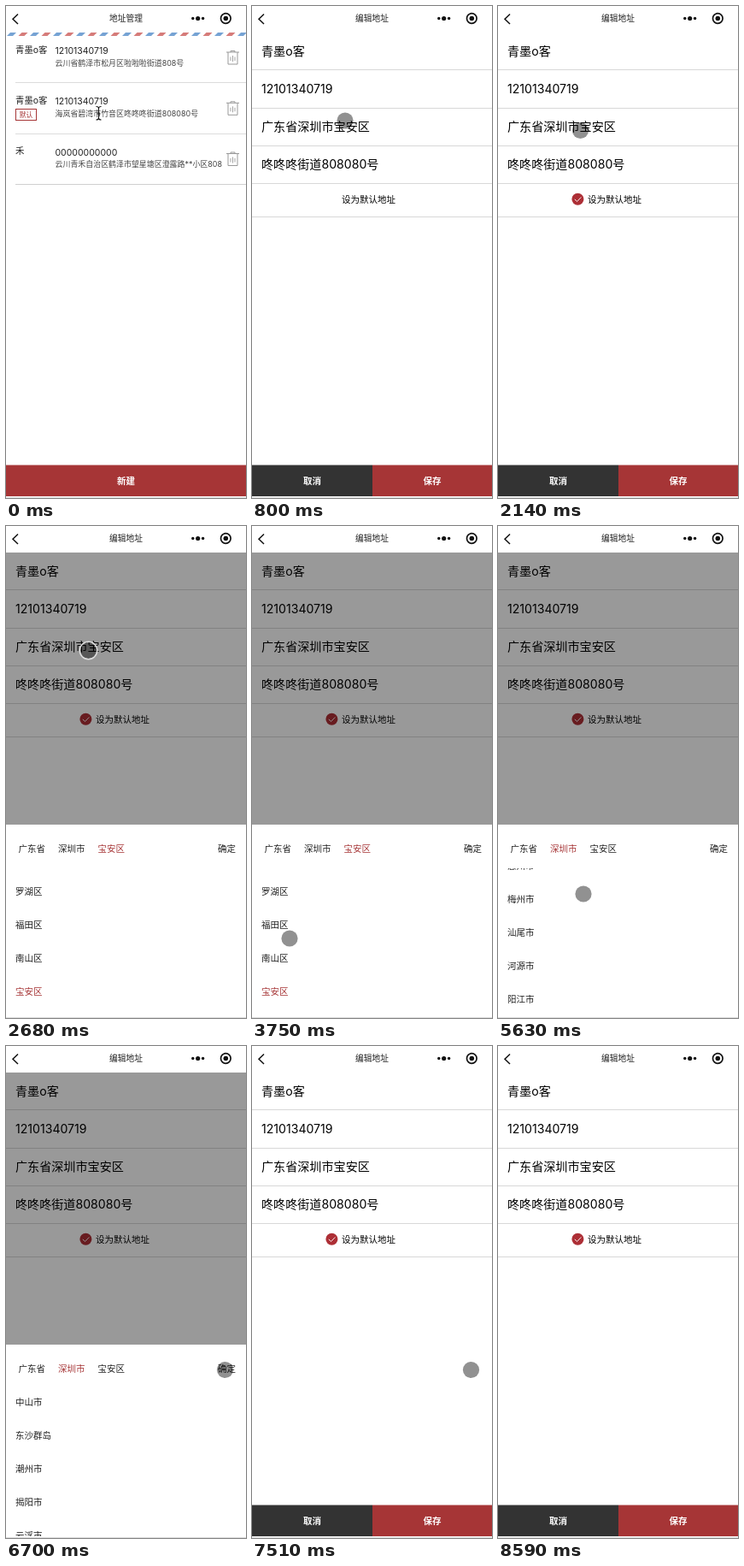
Animation of 281 by 575 pixels, one loop 9.39 s. Source, as an HTML page:

```html
<!DOCTYPE html>
<html lang="zh-CN">
<head>
<meta charset="utf-8">
<title>地址管理</title>
<style>
  html, body { margin: 0; width: 100%; height: 100%; overflow: hidden; background: #fff; }
  svg { display: block; width: 100vw; height: 100vh; }
  text { font-family: Inter, "Noto Sans CJK SC", "Noto Sans CJK", sans-serif; white-space: pre; }
</style>
</head>
<body>
<svg id="stage" viewBox="0 0 281 575"></svg>
<script>
const LOOP = 9390, RED = '#a63536', INK = '#222', ROW = 39;
const stage = document.getElementById('stage');

const text = (x, middle, size, content, extra = '') =>
  `<text x="${x}" y="${middle + size * 0.37}" font-size="${size}" fill="${INK}" ${extra}>${content}</text>`;
const rect = (x, y, w, h, fill, extra = '') =>
  `<rect x="${x}" y="${y}" width="${w}" height="${h}" fill="${fill}" ${extra}/>`;
const rule = (x, y, color = '#dcdcdc') => rect(x, y, 281 - x, 1, color);
const button = (x, w, label, fill) => rect(x, 536.5, w, 36.5, fill) +
  text(x + w / 2, 555, 10.5, label, 'style="fill:#fff" font-weight="700" text-anchor="middle"');

// Address list
const trash = y => `<g transform="translate(265.5 ${y})" fill="none" stroke="#999">
  <path d="M-7.5-6.5H7.5M-2.5-6.5V-8H2.5V-6.5M-5.5-6.5V7.5H5.5V-6.5"/>
  <path d="M-2.5-1V3.5M0-2.5V4.5M2.5-1V3.5" stroke-width=".9"/></g>`;
const entry = (y, name, phone, address) =>
  text(11, y, 10.4, name) + text(57.5, y + 1.3, 10.5, phone) +
  text(57.5, y + 15.5, 8.95, address, 'style="fill:#444"') + trash(y + 9.5);

const stripes = Array.from({ length: 22 }, (_, i) => {
  const x = i * 13.5 + 1;
  return `<path d="M${x} 35l4-4h7l-4 4z" fill="${i % 2 ? '#d67c7a' : '#76a3d4'}"/>`;
}).join('');

const listPage = stripes +
  entry(51, '青墨o客', '12101340719', '云川省鹤泽市松月区啦啦啦街道808号') +
  entry(110.3, '青墨o客', '12101340719', '海岚省碧湾市竹音区咚咚咚街道808080号') +
  entry(169.5, '禾', '00000000000', '云川青禾自治区鹤泽市望星塘区澄露路**小区808') +
  rule(11, 89) + rule(11, 149) + rule(11, 208, '#d0d0d0') +
  rect(11.5, 120.5, 24, 13, 'none', `stroke="${RED}"`) +
  text(23.5, 127, 7.8, '默认', `style="fill:${RED}" text-anchor="middle"`) +
  button(0, 281, '新建', RED);

// Edit form
const fields = ['青墨o客', '12101340719', '广东省深圳市宝安区', '咚咚咚街道808080号'];
const editPage = rect(0, 31, 281, 542, '#fff') +
  fields.map((field, i) => text(11, 52.6 + i * 44.2, 14.1, field, 'style="fill:#000"')).join('') +
  [74, 119, 163, 207, 246].map(y => rule(0, y, '#d8d8d8')).join('') +
  `<g id="check"><circle cx="93.4" cy="225.7" r="7" fill="#ad2f36"/>
   <path d="M89.8 225.8l2.7 2.7 4.8-5" fill="none" stroke="#fff" stroke-width=".9"/></g>` +
  text(105, 226, 10.5, '设为默认地址', 'style="fill:#000"') +
  button(0, 141, '取消', '#333') + button(141, 140, '保存', RED);

// Region picker
const districts = ['罗湖区', '福田区', '南山区', '宝安区'];
const cities = ['广州市', '韶关市', '深圳市', '珠海市', '汕头市', '佛山市', '江门市', '湛江市',
  '茂名市', '肇庆市', '惠州市', '梅州市', '汕尾市', '河源市', '阳江市', '清远市', '东莞市',
  '中山市', '东沙群岛', '潮州市', '揭阳市', '云浮市'];
const options = (items, selected) => items.map((item, i) =>
  text(11, 427 + i * ROW, 10.5, item, item === selected ? `style="fill:${RED}"` : '')).join('');
const picker = rect(0, 31, 281, 318, '#000', 'opacity=".4"') + rect(0, 349, 281, 224, '#fff') +
  text(14.5, 377.5, 10.5, '广东省') +
  text(61, 377.5, 10.5, '深圳市', 'id="cityTab"') +
  text(107.5, 377.5, 10.5, '宝安区', 'id="districtTab"') +
  text(248, 377.5, 10.5, '确定') +
  `<clipPath id="listArea"><rect y="400" width="281" height="173"/></clipPath>
   <g clip-path="url(#listArea)">
     <g id="districtList">${options(districts, '宝安区')}</g>
     <g id="cityList">${options(cities, '深圳市')}</g>
   </g>`;

const header = rect(0, 0, 281, 31, '#fff') +
  `<path d="M14 9.5L8 15.200l6 5.800" fill="none" stroke="#111" stroke-width="1.5"/>
   <g fill="#111"><circle cx="218.8" cy="14.5" r="1.7"/><circle cx="224.7" cy="14.5" r="2.6"/>
   <circle cx="230.6" cy="14.5" r="1.7"/><circle cx="257.3" cy="14.5" r="2.8"/></g>
   <circle cx="257.3" cy="14.5" r="5.8" fill="none" stroke="#111" stroke-width="1.7"/>` +
  text(140.5, 14.3, 9.75, '', 'id="title" text-anchor="middle"');

stage.innerHTML = rect(0, 0, 281, 575, '#fff') +
  `<g id="listPage">${listPage}</g><g id="editPage">${editPage}</g><g id="picker">${picker}</g>` +
  header + rule(0, 574, '#ddd') +
  `<path id="beam" d="M105.5 117.5q3 0 3 2v11.5q0 2-3 2M111.5 117.5q-3 0-3 2v11.5q0 2 3 2M106.5 126h4"
    fill="none" stroke="#111" stroke-width="1.1"/>
   <g id="touch"><circle r="9.6" opacity=".43"/>
   <circle id="ring" r="10.2" fill="none" stroke="#ddd" stroke-width="1.5"/></g>`;

const part = Object.fromEntries([...stage.querySelectorAll('[id]')].map(el => [el.id, el]));
const show = (el, visible) => el.setAttribute('display', visible ? 'inline' : 'none');
const move = (el, x, y) => el.setAttribute('transform', `translate(${x} ${y})`);

// Stepped tracks: [start time, values...]
const touchTrack = [
  [800, 109, 134], [1340, 108, 123], [1610, 97, 138], [1870, 99, 145], [2140, 96.5, 145.5],
  [3210, 109, 352], [3480, 108.5, 514], [3750, 44, 482], [4020, 70, 366], [4280, 72, 383],
  [4550, 71.5, 381.5], [5090, 70.5, 491], [5360, 69, 422], [5630, 100, 430], [5890, 218.5, 408],
  [6160, 244, 387], [6430, 258, 380], [6700, 256.5, 378.5], [8050, 186, 468], [8320, 157.5, 500]
];
const scrollTrack = [[0, 0], [5360, 69], [5630, 420], [5890, 674]];
const at = (track, t) => track.findLast(step => step[0] <= t);

function draw(t) {
  const during = (from, to) => t >= from && t < to;
  const pickingCity = t >= 4820;

  part.title.textContent = t < 260 ? '地址管理' : '编辑地址';
  show(part.editPage, t >= 530);
  move(part.editPage, t < 800 ? 234 : 0, 0);
  show(part.check, t >= 1070);

  show(part.picker, during(2680, 7510));
  part.cityTab.style.fill = pickingCity ? RED : INK;
  part.districtTab.style.fill = pickingCity ? INK : RED;
  show(part.districtList, !pickingCity);
  show(part.cityList, pickingCity);
  move(part.cityList, 0, -at(scrollTrack, t)[1]);

  show(part.beam, t < 800);
  show(part.touch, during(800, 8590));
  show(part.ring, during(2680, 3210));
  const touch = at(touchTrack, t);
  if (touch) move(part.touch, touch[1], touch[2]);
}

const start = performance.now();
function tick() {
  draw((performance.now() - start) % LOOP);
  requestAnimationFrame(tick);
}
tick();
</script>
</body>
</html>
```
